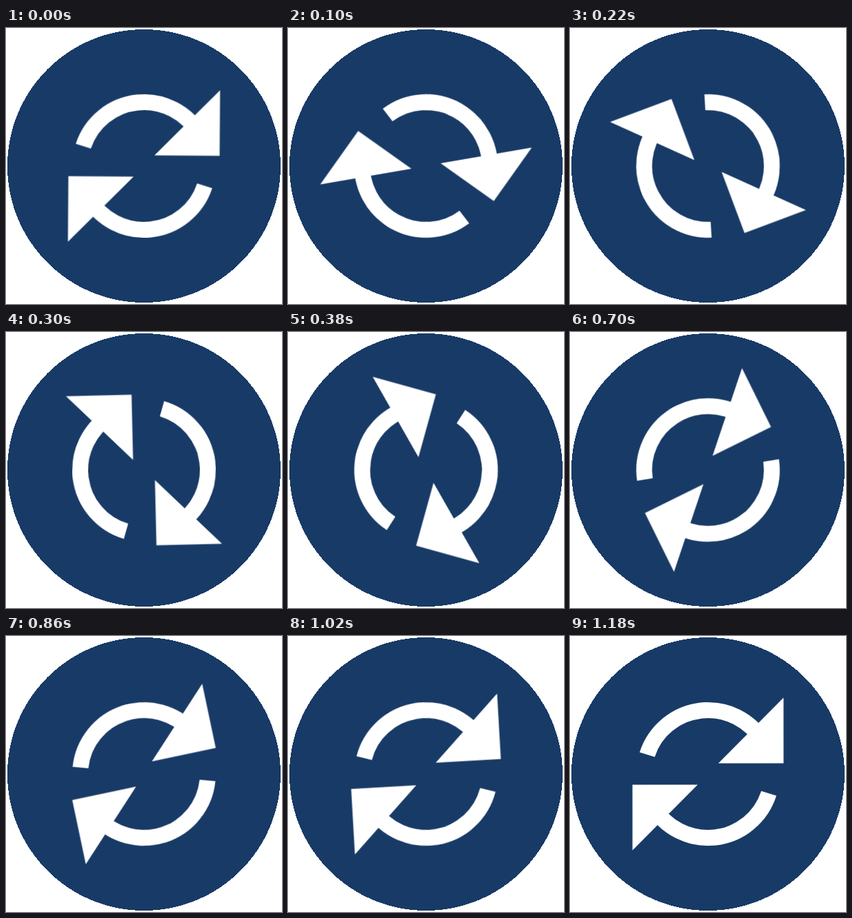
An HTML page that plays this animation: 400x400 px, repeating every 1200 ms.

```html
<!DOCTYPE html>
<html lang="en">
<head>
<meta charset="utf-8">
<title>Refresh</title>
<style>
  html, body { margin: 0; width: 100%; height: 100%; overflow: hidden; background: #fff; }
  svg { display: block; width: 100vw; height: 100vh; }
  .disc { fill: #183a66; shape-rendering: crispEdges; }
  .shaft { fill: none; stroke: #fff; stroke-width: 23; }
  .head { fill: #fff; }
  #arrows { transform-origin: 0 0; }
</style>
</head>
<body>
<svg viewBox="-200 -200 400 400">
  <defs>
    <g id="arrow">
      <path class="shaft"/>
      <path class="head" d="M109.5-110.5V-15.5H15Z"/>
    </g>
  </defs>
  <circle class="disc" r="198"/>
  <g id="arrows">
    <use href="#arrow"/>
    <use href="#arrow" transform="rotate(180)"/>
  </g>
</svg>
<script>
  const RADIUS = 92.5;
  const TAIL = -162.3, NECK = -30; // shaft ends, in degrees

  const point = deg => {
    const a = deg * Math.PI / 180;
    return `${RADIUS * Math.cos(a)} ${RADIUS * Math.sin(a)}`;
  };

  document.querySelector('.shaft').setAttribute('d',
    `M${point(TAIL)}A${RADIUS} ${RADIUS} 0 0 1 ${point(NECK)}`);

  // Half a turn lands on the same figure, so the loop is seamless.
  document.getElementById('arrows').animate(
    [{ transform: 'rotate(0deg)' }, { transform: 'rotate(180deg)' }],
    { duration: 1200, iterations: Infinity, easing: 'cubic-bezier(.192, .5, .545, 1)' }
  );
</script>
</body>
</html>
```
